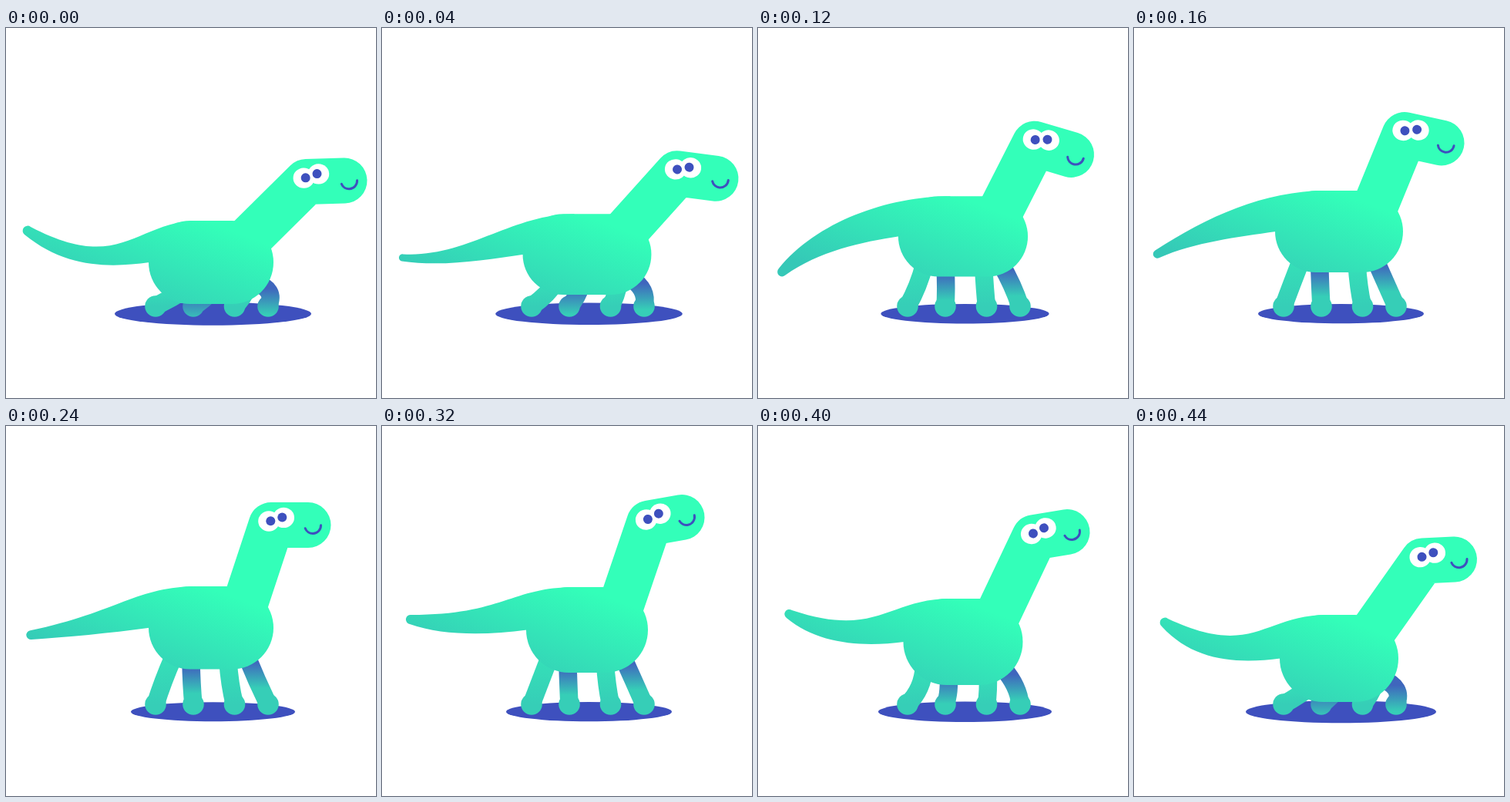
Write an HTML page with a canvas that moves like this. It is 480 px wide and 480 px high and loops after 480 ms.

```html
<!DOCTYPE html>
<html lang="en">
<head>
<meta charset="utf-8">
<title>Bouncing dinosaur</title>
<style>
  html, body { margin: 0; width: 100%; height: 100%; overflow: hidden; background: #fff; }
  canvas { display: block; }
</style>
</head>
<body>
<canvas id="stage" width="480" height="480"></canvas>
<script>
const ctx = document.getElementById('stage').getContext('2d');
const LOOP = 480, STEP = 40;
const GREEN = '#33ffb9', TEAL = '#35c8b7', BLUE = '#3e50be';
const TIMES = [0, 80, 160, 240, 320, 400, 440];
const TIP_TIMES = [0, 40, 80, 160, 240, 320, 400, 440];

// Periodic Hermite spline through values at uneven times
function track(values, times = TIMES) {
  const n = values.length;
  const at = i => {
    const k = (i + n) % n;
    return [times[k] + LOOP * Math.floor(i / n), values[k]];
  };
  const tangent = i => {
    const [t0, v0] = at(i - 1), [t1, v1] = at(i), [t2, v2] = at(i + 1);
    const a = t1 - t0, b = t2 - t1;
    return ((v1 - v0) / a * b + (v2 - v1) / b * a) / (a + b);
  };
  return time => {
    let i = n - 1;
    while (times[i] > time) i--;
    const [t0, v0] = at(i), [t1, v1] = at(i + 1);
    const h = t1 - t0, u = (time - t0) / h, w = 1 - u;
    return v0 * (1 + 2 * u) * w * w + v1 * u * u * (3 - 2 * u)
      + h * u * w * (tangent(i) * w - tangent(i + 1) * u);
  };
}

const tracks = {
  top: track([250, 228, 211, 208, 209, 224, 245]),
  bottom: track([358, 331, 317, 315.5, 320, 336, 358]),
  half: track([81, 84.5, 83, 81, 79, 77.5, 77]),
  shadow: track([127.5, 112.5, 107.5, 106.5, 107.5, 112.5, 123.5]),
  jointX: track([389.5, 368.5, 351, 344, 346.5, 358.5, 374.5]),
  jointY: track([199.5, 165, 138.5, 128.5, 126, 144.5, 175]),
  noseX: track([439, 416, 399, 392, 389, 401, 415.5]),
  noseY: track([198, 179.5, 149, 128.5, 118.5, 137.5, 173]),
  upX: track([32, 27.5, 27, 27.5, 31.5, 38, 44, 44], TIP_TIMES),
  upY: track([258, 324.5, 288.5, 265.3, 245, 239, 250]),
  lowX: track([24, 25.5, 35, 33, 33, 36, 37, 36], TIP_TIMES),
  lowY: track([268, 332.5, 298, 277, 257, 249, 260]),
  bendX: track([150, 72, 95, 147, 157, 155, 155]),
  bendY: track([320, 265, 245, 241, 245, 276, 302]),
  bellyY: track([312, 303, 278, 274, 272, 283, 306]),
};

// Each leg: foot x, then [hipX, hipY, kneeX, kneeY] standing, half bent, crouched
const LEGS = [
  { foot: 243, far: true, poses: [[240, 305, 240.5, 335], [246.5, 318, 249, 346], [270, 338, 256, 354]] },
  { foot: 340, far: true, poses: [[312, 298, 325, 330], [318, 314, 338, 338], [322, 330, 351, 339]] },
  { foot: 194, poses: [[217, 300, 203, 332], [215, 312, 214, 341], [238, 336, 216, 350]] },
  { foot: 296.5, poses: [[288, 305, 290, 335], [298, 318, 299, 345], [316, 332, 307, 352]] },
];
const FOOT_Y = 361, HALF_BENT = 0.42;

function gradient(x0, y0, x1, y1, from, to) {
  const g = ctx.createLinearGradient(x0, y0, x1, y1);
  g.addColorStop(0, from);
  g.addColorStop(1, to);
  return g;
}

function ellipse(x, y, rx, ry, color) {
  ctx.fillStyle = color;
  ctx.beginPath();
  ctx.ellipse(x, y, rx, ry, 0, 0, Math.PI * 2);
  ctx.fill();
}

function drawLeg({ foot, far, poses }, crouch) {
  const bent = crouch > HALF_BENT;
  const u = bent ? (crouch - HALF_BENT) / (1 - HALF_BENT) : crouch / HALF_BENT;
  const [from, to] = bent ? poses.slice(1) : poses;
  const [hipX, hipY, kneeX, kneeY] = from.map((v, i) => v + (to[i] - v) * u);
  const paint = far
    ? gradient(0, hipY + 8, 0, hipY + 42, '#3f66bd', '#36ceb7')
    : gradient(0, hipY, 0, FOOT_Y, '#35e0b8', '#36ceb7');
  ctx.strokeStyle = paint;
  ctx.lineWidth = 23.5;
  ctx.lineCap = 'butt';
  ctx.beginPath();
  ctx.moveTo(hipX, hipY);
  ctx.quadraticCurveTo(kneeX, kneeY, foot, FOOT_Y);
  ctx.stroke();
  ellipse(foot, FOOT_Y, 13.8, 13.8, paint);
}

function drawNeckAndHead(p, baseX, baseY) {
  ctx.strokeStyle = GREEN;
  ctx.lineWidth = 59;
  ctx.lineCap = ctx.lineJoin = 'round';
  ctx.beginPath();
  ctx.moveTo(baseX, baseY);
  ctx.lineTo(p.jointX, p.jointY);
  ctx.lineTo(p.noseX, p.noseY);
  ctx.stroke();
}

function drawFace(p) {
  const dx = p.noseX - p.jointX, dy = p.noseY - p.jointY;
  ctx.save();
  ctx.translate(p.jointX, p.jointY);
  ctx.rotate(Math.atan2(dy, dx));
  ellipse(-3, -5, 13.8, 13.2, '#fff');
  ellipse(16.2, -9.6, 13.8, 13.2, '#fff');
  ellipse(-0.7, -5.2, 6, 6, BLUE);
  ellipse(14.3, -10, 6, 6, BLUE);
  ctx.strokeStyle = BLUE;
  ctx.lineWidth = 3;
  ctx.beginPath();
  ctx.arc(Math.hypot(dx, dy) + 6, 0.5, 10.5, -0.03, 2.78);
  ctx.stroke();
  ctx.restore();
}

function drawBody(p, middle) {
  const left = 266 - p.half, height = p.bottom - p.top;
  ctx.fillStyle = gradient(260, p.top, 204, p.top + 145, GREEN, TEAL);
  ctx.beginPath();
  ctx.roundRect(left, p.top, p.half * 2, height, height / 2);
  ctx.fill();

  const tipX = (p.upX + p.lowX) / 2, tipY = (p.upY + p.lowY) / 2;
  const angle = Math.atan2(p.upY - tipY, p.upX - tipX);
  ctx.beginPath();
  ctx.moveTo(250, p.top);
  ctx.bezierCurveTo(168, p.top, p.bendX, p.bendY, p.upX, p.upY);
  ctx.arc(tipX, tipY, Math.hypot(p.upX - tipX, p.upY - tipY), angle, angle + Math.PI, true);
  ctx.bezierCurveTo(78, p.bellyY, 135, middle + 7, left + 1, middle);
  ctx.closePath();
  ctx.fill();
}

function draw(time) {
  const p = {};
  for (const name in tracks) p[name] = tracks[name](time);
  const middle = (p.top + p.bottom) / 2;
  const crouch = Math.min(1, Math.max(0, (middle - 262) / 42));

  ctx.fillStyle = '#fff';
  ctx.fillRect(0, 0, 480, 480);
  ellipse(268.5, 370.7, p.shadow, 12.5 + (p.shadow - 106.5) * 0.12, BLUE);
  for (const leg of LEGS) drawLeg(leg, crouch);
  drawNeckAndHead(p, 300 - 16 * crouch ** 1.2, middle);
  drawBody(p, middle);
  drawFace(p);
}

function tick() {
  draw(Math.floor(performance.now() % LOOP / STEP) * STEP);
  requestAnimationFrame(tick);
}
tick();
</script>
</body>
</html>
```
